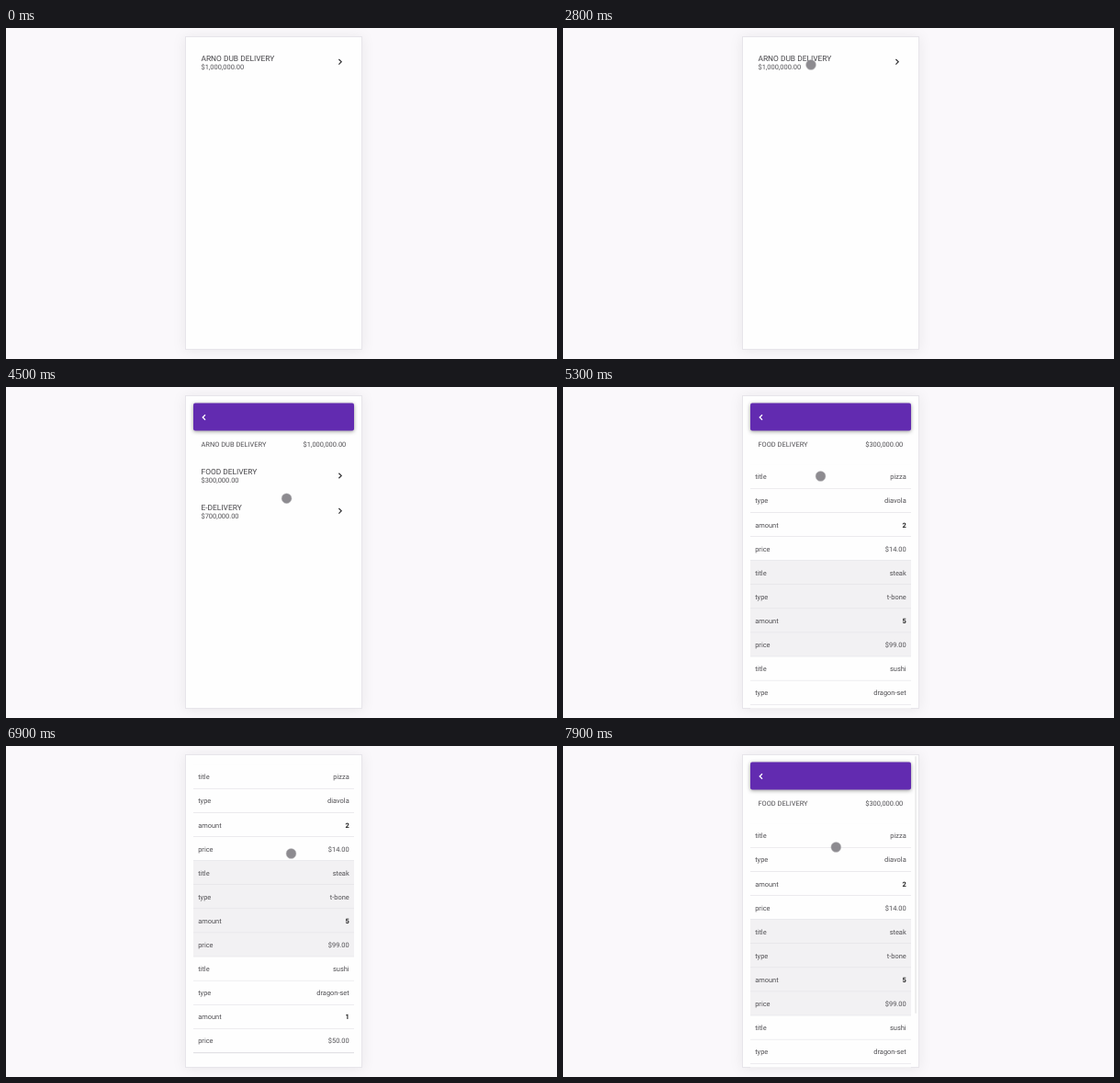
Animation of 600 by 360 pixels, one loop 8000 ms. Source, as an HTML page:

```html
<!DOCTYPE html>
<html lang="en">
<head>
<meta charset="utf-8">
<title>Delivery drill-down list</title>
<style>
html, body { margin: 0; width: 100%; height: 100%; overflow: hidden; background: #faf8fb; }
svg { display: block; }
text { font-family: Roboto, Arial, sans-serif; font-size: 7.45px; fill: #504f53; text-rendering: geometricPrecision; }
.name { font-size: 8.4px; fill: #454448; }
.end { text-anchor: end; }
.bold { font-weight: 700; fill: #222; }
.chevron { fill: none; stroke: #3a3a3c; stroke-width: 1.25; }
.card { fill: #fefefe; stroke: #e7e5ea; filter: drop-shadow(0 1px 7px rgba(0, 0, 0, .07)); }
.bar { fill: #622bb0; filter: drop-shadow(0 1.5px 2px rgba(0, 0, 0, .4)); }
</style>
</head>
<body>
<svg width="600" height="360" viewBox="0 0 600 360">
  <clipPath id="screen"><rect x="196" y="10" width="191" height="339.5"/></clipPath>
  <rect class="card" x="195.5" y="9.5" width="192" height="340"/>
  <g clip-path="url(#screen)">
    <g id="pages"></g>
    <rect id="thumb" x="383.2" width="1.8" height="280" rx=".9" fill="#b3b2b6"/>
  </g>
  <circle id="pointer" r="5.5" fill="#87858a" fill-opacity=".95" stroke="#c9c8cb" stroke-width=".5"/>
</svg>
<script>
const LOOP = 8000, STEP = 100;
const $ = id => document.getElementById(id);

const text = (x, y, str, cls = '') => `<text x="${x}" y="${y}" class="${cls}">${str}</text>`;

const item = (y, name, sum) =>
  text(212.5, y + 3, name, 'name') + text(212.5, y + 12.2, sum) +
  `<path class="chevron" d="M362.4 ${y + 1.5}l2.8 2.8-2.8 2.8"/>`;

const header = (name, sum) =>
  `<rect class="bar" x="204" y="17.5" width="175" height="30" rx="2"/>
   <path class="chevron" style="stroke:#fff" d="M217 30.2l-2.8 2.8 2.8 2.8"/>` +
  text(212.5, 65.2, name) + text(370.3, 65.2, sum, 'end');

const PITCH = 26.1;
const row = (label, value, i) => {
  const y = 84.5 + PITCH * i;
  const shaded = i >> 2 & 1;
  return `<rect x="204" y="${y}" width="175" height="${PITCH}" fill="${shaded ? '#f2f1f3' : '#fefefe'}"/>
    <path d="M204 ${y + PITCH}h175" stroke="#dddce1"/>` +
    text(209.2, y + 15.8, label) +
    text(373.7, y + 15.8, value, label === 'amount' ? 'end bold' : 'end');
};

const dishes = [
  { title: 'pizza', type: 'diavola', amount: 2, price: '$14.00' },
  { title: 'steak', type: 't-bone', amount: 5, price: '$99.00' },
  { title: 'sushi', type: 'dragon-set', amount: 1, price: '$50.00' }
];
const owner = 'ARNO DUB DELIVERY', total = '$1,000,000.00';
const food = 'FOOD DELIVERY', foodSum = '$300,000.00';

$('pages').innerHTML = [
  item(32.5, owner, total),
  header(owner, total) + item(92.2, food, foodSum) + item(130.5, 'E-DELIVERY', '$700,000.00'),
  header(food, foodSum) +
    dishes.flatMap(Object.entries).map(([label, value], i) => row(label, value, i)).join('')
].map(page => `<g>${page}</g>`).join('');
const pages = [...$('pages').children];

const ramp = (t, from, to) => Math.min(1, Math.max(0, (t - from) / (to - from)));
const easeOut = k => 1 - (1 - k) ** 1.4;

// Each glide bends towards an optional control point.
const start = [382.5, 51];
const glides = [
  { from: 1700, to: 2200, end: [266, 56], via: [310, 245] },
  { from: 2500, to: 2800, end: [270, 40] },
  { from: 3300, to: 4100, end: [221, 40], via: [316, 90] },
  { from: 4200, to: 4600, end: [282, 91], via: [355, 180] },
  { from: 4700, to: 4900, end: [280.5, 97] },
  { from: 5300, to: 5800, end: [310.5, 110.5] },
  { from: 6100, to: 6600, end: [310.5, 117] },
  { from: 7700, to: 7900, end: [297.3, 110] }
];

const pointerAt = t => glides.reduce((pos, { from, to, end, via }) => {
  const k = ramp(t, from, to);
  return pos.map((a, n) => {
    const mid = via ? via[n] : (a + end[n]) / 2;
    return a * (1 - k) ** 2 + 2 * mid * k * (1 - k) + end[n] * k * k;
  });
}, start);

const scrollAt = t => 64 * (easeOut(ramp(t, 6000, 6600)) - easeOut(ramp(t, 7000, 7400)));
const flash = (t, on, off) => ramp(t, on, on + 100) - ramp(t, off, off + 200);

function draw() {
  const t = Math.floor(performance.now() % LOOP / STEP) * STEP;
  const current = t < 3400 ? 0 : t < 5300 ? 1 : 2;
  pages.forEach((page, i) => page.style.display = i === current ? '' : 'none');

  const scroll = scrollAt(t);
  $('pages').setAttribute('transform', `translate(0 ${-scroll})`);
  $('thumb').setAttribute('y', 11 + scroll * .83);
  $('thumb').setAttribute('opacity', flash(t, 6000, 6700) + flash(t, 7000, 7750));

  const [x, y] = pointerAt(t);
  $('pointer').setAttribute('cx', x);
  $('pointer').setAttribute('cy', y);
  $('pointer').style.display = t < 1700 ? 'none' : '';
  requestAnimationFrame(draw);
}
draw();
</script>
</body>
</html>
```
